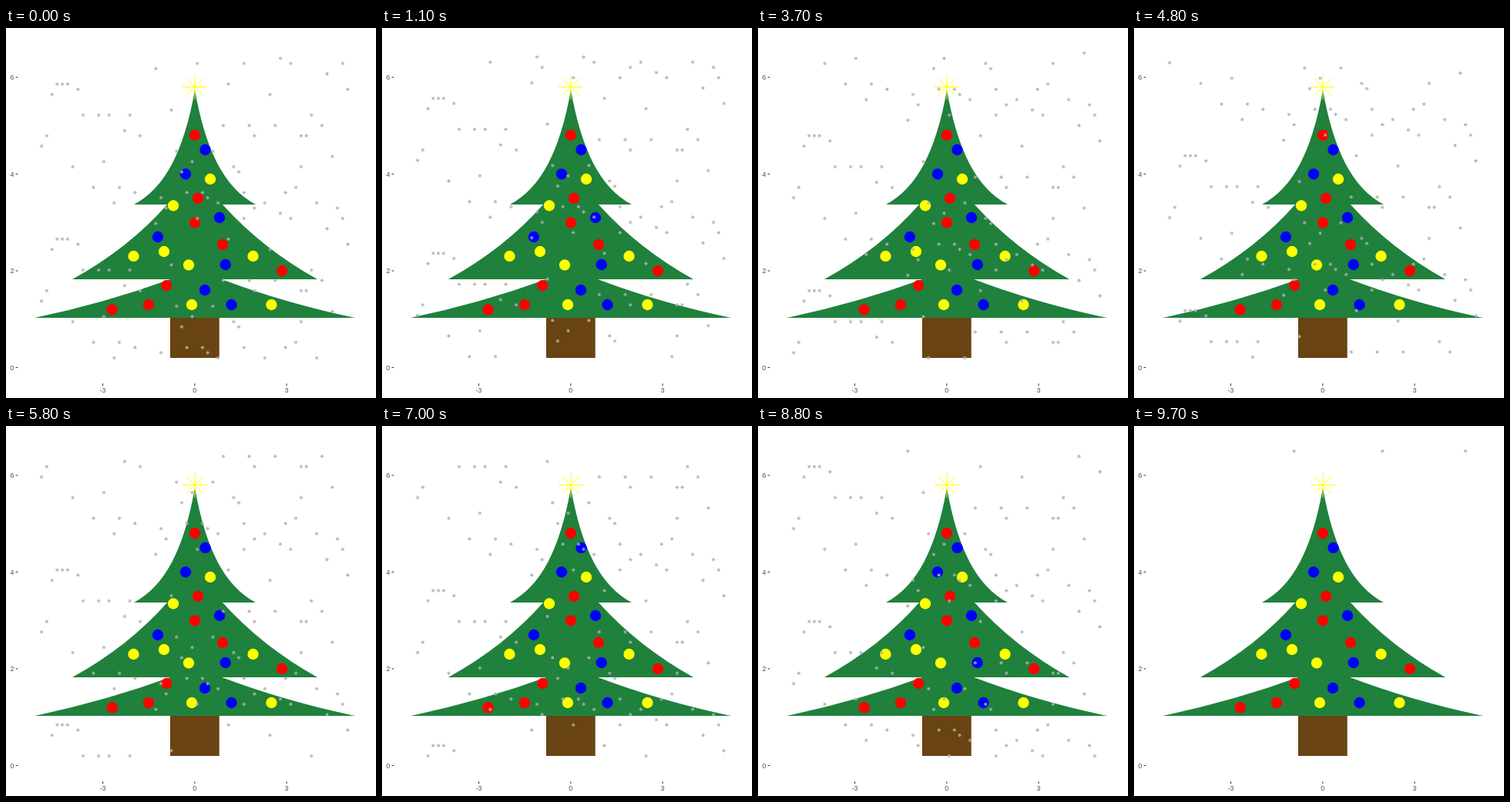
An HTML page that plays this animation: 480x480 px, repeating every 10000 ms.

```html
<!DOCTYPE html>
<html lang="en">
<head>
<meta charset="utf-8">
<title>Snowy tree</title>
<style>
  html, body { margin: 0; width: 100%; height: 100%; overflow: hidden; background: #fff; }
  svg { display: block; width: 100vw; height: 100vh; }
  text { font: 8.8px "Liberation Sans", Arial, sans-serif; fill: #4d4d4d; }
  .ticks { stroke: #333; stroke-width: 1.07; }
  .tree { fill: #1f813c; }
  .star { stroke: #ff0; stroke-width: 1; fill: none; }
  .snow { stroke: #b0b0b0; stroke-width: .9; fill: none; }
</style>
</head>
<body>
<svg viewBox="0 0 480 480">
  <g id="axes"><path class="ticks" id="ticks"/></g>
  <rect x="213" y="375" width="63.7" height="53" fill="#694312"/>
  <g class="tree">
    <path d="M213 326Q128 357 37 376H453Q362 357 280 326Z"/>
    <path d="M210 228Q159 286 86 326H404Q332 286 280 228Z"/>
    <path d="M245 80C231 160 206 208 166 229H324C284 208 259 160 245 80Z"/>
  </g>
  <path class="star" d="M229 76.5H261M245 60.5V92.5M233.7 65.2L256.3 87.8M233.7 87.8L256.3 65.2"/>
  <g id="balls"></g>
  <path class="snow" id="snow"/>
</svg>
<script>
const NS = 'http://www.w3.org/2000/svg';
const $ = id => document.getElementById(id);
const add = (parent, tag, attrs, text) => {
  const el = document.createElementNS(NS, tag);
  for (const k in attrs) el.setAttribute(k, attrs[k]);
  if (text) el.textContent = text;
  parent.appendChild(el);
};
const px = x => 244.8 + 39.73 * x;
const py = y => 440.5 - 62.75 * y;

// Axes
let ticks = '';
for (const y of [0, 2, 4, 6]) {
  ticks += `M12.6 ${py(y)}h2.75`;
  add($('axes'), 'text', { x: 10.3, y: py(y) + 3.2, 'text-anchor': 'end' }, String(y));
}
for (const x of [-3, 0, 3]) {
  ticks += `M${px(x)} 461.2v2.75`;
  add($('axes'), 'text', { x: px(x), y: 472.8, 'text-anchor': 'middle' }, String(x));
}
$('ticks').setAttribute('d', ticks);

// Baubles
const balls = {
  red: [[245, 139], [249, 221], [245, 252.5], [281, 281], [358, 315], [208.3, 334], [185, 359], [137.7, 365.3]],
  blue: [[258.5, 158], [233, 189.5], [277, 246], [197, 271], [284.7, 307], [258, 340], [292.5, 359]],
  yellow: [[265, 196], [217, 230.5], [165.5, 296], [205, 290], [237, 307.5], [320.5, 296], [241, 359], [344.4, 359]]
};
for (const fill in balls)
  for (const [cx, cy] of balls[fill]) add($('balls'), 'circle', { cx, cy, r: 7.2, fill });

// Snow: columns of the flakes in each of the 30 repeating rows
const ROWS = 30, LAST = 59;
const flakes = [
  [24, 41, 57], [46], [30, 39, 48, 58], [22], [55], [],
  [3, 4, 5, 36], [7, 59], [2, 44], [], [], [25],
  [8, 11, 13, 17, 52], [], [35, 40, 45, 54], [16], [1, 19, 41, 50, 51], [],
  [0], [26, 33], [56], [12, 29], [6, 37, 50], [27, 38],
  [], [], [10, 15, 49], [18, 28, 31, 39, 47], [23, 32], [14, 34, 43, 53]
];
// Fall in rows at given tenths of a second; flat parts are pauses
const fall = [
  [0, 0], [16, 4], [17, 4], [19, 5], [20, 5], [22, 5.5], [23, 6], [24, 6], [37, 10],
  [56, 16.67], [57, 16.67], [58, 17], [79, 24], [81, 24], [88, 27], [97, 30], [100, 30]
];
const fallAt = n => {
  const i = fall.findIndex(k => k[0] > n);
  const [a, u] = fall[i - 1], [b, v] = fall[i];
  return u + (v - u) * (n - a) / (b - a);
};
const flake = (col, row) => {
  const x = px(-5 + 10 * col / LAST), y = py(6.5 - 6.3 * row / LAST);
  return `M${x - 2.3} ${y}h4.6M${x} ${y - 2.3}v4.6` +
    `M${x - 1.6} ${y - 1.6}l3.2 3.2M${x - 1.6} ${y + 1.6}l3.2 -3.2`;
};
const snowAt = n => {
  const s = fallAt(n);
  if (s >= ROWS) return flakes[0].map(c => flake(c, 0)).join('');
  let d = '';
  flakes.forEach((cols, r) => {
    const top = (r + s) % ROWS;
    for (const row of [top, top + ROWS])
      if (row <= LAST + .001 && (row || s))
        for (const c of cols) d += flake(c, row);
  });
  return d;
};

let shown = -1;
const draw = () => {
  const n = Math.floor(performance.now() % 10000 / 100);
  if (n !== shown) $('snow').setAttribute('d', snowAt(shown = n));
  requestAnimationFrame(draw);
};
draw();
</script>
</body>
</html>
```
